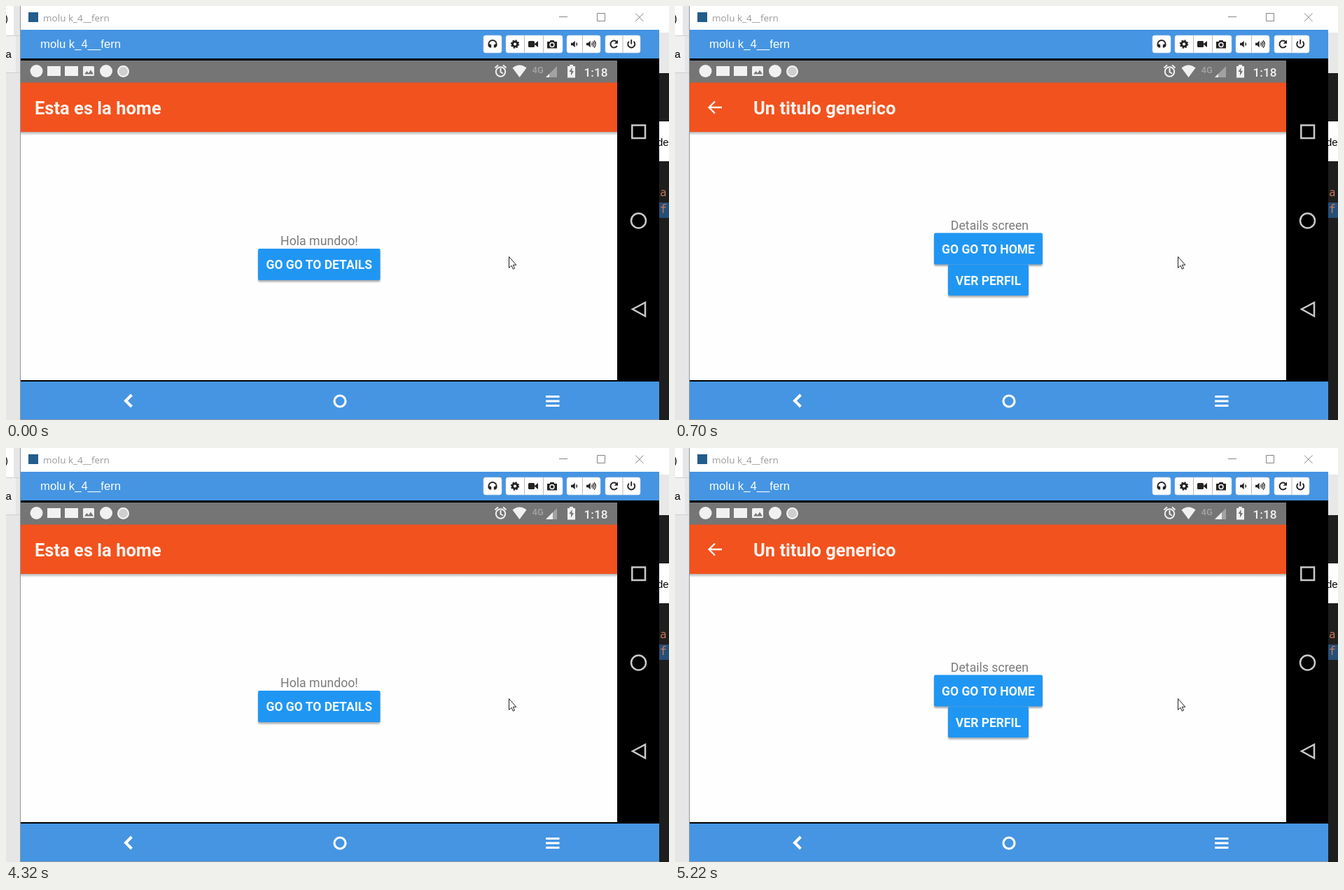
An HTML page for the animation above (8 s loop, 947x592 px).

```html
<!DOCTYPE html>
<html lang="es">
<head>
<meta charset="utf-8">
<title>Navegación entre pantallas</title>
<style>
  html, body { margin: 0; width: 100%; height: 100%; overflow: hidden; background: #e6e6e6; }
  svg { display: block; width: 947px; height: 592px; }
  .ui { font-family: "Liberation Sans", Arial, sans-serif; }
  .app { font-family: Roboto, sans-serif; }
  .title { font-size: 25.5px; font-weight: 700; fill: #fff5f0; }
  .label { font-size: 17.7px; fill: #7b7b7b; text-anchor: middle; }
  .action { font-size: 17.5px; font-weight: 700; fill: #f2f9ff; text-anchor: middle; }
  .code { font: 16px "Noto Sans Mono", monospace; fill: #c97b5b; }
  .line { fill: none; stroke-linejoin: miter; }
</style>
</head>
<body>
<svg viewBox="0 0 947 592">
  <defs>
    <linearGradient id="fade" x2="0" y2="1">
      <stop offset="0" stop-color="#999" stop-opacity=".75"/>
      <stop offset="1" stop-color="#999" stop-opacity="0"/>
    </linearGradient>
    <filter id="soft" x="-10%" y="-20%" width="120%" height="150%">
      <feGaussianBlur stdDeviation="1.3"/>
    </filter>
    <clipPath id="screen"><path d="M21 78H873V535H21Z"/></clipPath>
  </defs>

  <!-- windows behind -->
  <g class="ui" font-size="15">
    <path fill="#e6e6e6" d="M0 0H21V592H0Z"/>
    <path fill="#fff" d="M0 0H11V42H0Z"/>
    <path fill="#f0f0f0" d="M0 43H14V95H0Z"/>
    <path stroke="#cfcfcf" d="M0 42.5H20M0 95.5H20"/>
    <text x="-2" y="23">)</text><text x="-.5" y="74">a</text>
    <path fill="#fff" d="M933 0H947V222H933Z"/>
    <path fill="#e8e8e8" d="M933 38H947V96H933Z"/>
    <path fill="#1e1e1e" d="M933 96H947V165H933ZM933 222H947V592H933Z"/>
    <path fill="#264f78" d="M933 281H947V303H933Z"/>
    <text x="930" y="200">de</text>
    <g class="code"><text x="934" y="272">a:</text><text x="934" y="296">f:</text></g>
  </g>

  <!-- mirror window -->
  <path fill="#fff" d="M21 0H933V34H21Z"/>
  <path fill="#235d8c" d="M32 9H46V23H32Z"/>
  <text x="53" y="21.5" font-family="Open Sans, sans-serif" font-size="13.5" fill="#999">molu k_4__fern</text>
  <path class="line" stroke="#858585" d="M790 15.5H802M844.5 10.5H855.5V21.5H844.5ZM899 10.5L910.5 22M910.5 10.5L899 22"/>
  <path fill="#4595e3" d="M21 34H933V75H21ZM21 537H933V591H21Z"/>
  <path fill="#000" d="M21 75H933V537H21Z"/>
  <path fill="#8d969e" d="M20 0H21V592H20ZM21 591H933V592H21Z"/>
  <text class="ui" x="49" y="60" font-size="16.7" fill="#fff">molu k_4__fern</text>

  <g id="tools" fill="#fff" stroke="#c9d5e2" stroke-width=".6"></g>
  <g fill="#242424">
    <path class="line" stroke="#242424" stroke-width="1.8" d="M689.5 56V54a5.5 5 0 0 1 11 0V56"/>
    <path d="M688.7 54.5h2.5l2 1v4h-2.2l-2.3-2ZM701.3 54.5h-2.5l-2 1v4h2.2l2.3-2Z"/>
    <circle class="line" cx="727" cy="54.5" r="3.6" stroke="#242424" stroke-width="3"/>
    <circle class="line" cx="727" cy="54.5" r="5.2" stroke="#242424" stroke-width="2" stroke-dasharray="2.04"/>
    <rect x="746" y="50" width="9" height="9" rx="1.5"/><path d="M755 54l5-4v9l-5-4Z"/>
    <path d="M773 51h3.5l1-2h5l1 2h3.5v9.5h-14Z"/>
    <circle cx="780" cy="55.5" r="3" class="line" stroke="#fff" stroke-width="1.4"/>
    <path id="speaker" d="M807 52.7h2.5l3.2-3v9.6l-3.2-3H807Z"/>
    <use href="#speaker" x="22"/>
    <path class="line" stroke="#242424" stroke-width="1.3" d="M814.6 52.5q1.8 2 0 4M836.6 52.5q1.8 2 0 4M838.3 50.8q3.2 3.7 0 7.4M840 49.2q4.6 5.3 0 10.6"/>
    <path class="line" stroke="#242424" stroke-width="2" d="M872.5 51.5a5 5 0 1 0 .3 5.5"/>
    <path d="M874 48.5v5.3h-5.3Z"/>
    <path class="line" stroke="#242424" stroke-width="1.9" d="M890 50.7a5 5 0 1 0 6.5 0M893.2 48v6.5"/>
  </g>

  <!-- phone display -->
  <g class="app" clip-path="url(#screen)">
    <path fill="#fefefe" d="M21 78H873V535H21Z"/>
    <g id="home"></g>
    <path id="veil" fill="#fefefe" d="M21 111H873V535H21Z"/>
    <g id="details"></g>

    <path fill="#757575" d="M21 78H873V109.5H21Z"/>
    <g fill="#f1f1f1">
      <circle cx="43.5" cy="93" r="9"/>
      <path d="M59 86H78V100H59ZM84 86H103V100H84Z"/>
      <rect x="110" y="86" width="16" height="14" rx="1.5"/>
      <path fill="#757575" d="M112 97.5l3.5-4.5 2.5 3 3-4.5 4 6Z"/>
      <circle cx="143" cy="93" r="9"/>
      <circle cx="167.500" cy="93.500" r="7.500" fill="#cfcfcf" stroke="#f4f4f4" stroke-width="2"/>
      <path class="line" stroke="#f1f1f1" stroke-width="2" d="M706.500 89v5.500l3.500 2M698.500 88.500l4.500-4M714.500 88.500l-4.500-4"/>
      <circle class="line" cx="706.500" cy="94" r="6.700" stroke="#f1f1f1" stroke-width="2"/>
      <path d="M723.500 88.500Q733.500 80.500 743.500 88.500L733.500 102Z"/>
      <text x="751.500" y="95.500" font-size="13" font-weight="500" fill="#a4a4a4">4G</text>
      <path fill="#a2a2a2" d="M771 102L787 86V102Z"/>
      <path id="signal" fill="#ededed"/>
      <path d="M802 86h3v-2h5v2h3v16.500h-11Z"/>
      <path fill="#757575" d="M808.500 88l-4 6h2.500v5.500l4-6.500h-2.500Z"/>
      <text x="825.500" y="100.500" font-size="17.300" font-weight="500">1:18</text>
    </g>
  </g>

  <!-- navigation keys -->
  <g class="line" stroke="#c9c9c9" stroke-width="2.500">
    <path d="M894.300 170.500H913V189H894.300ZM895 433.500L913 424V443.500Z"/>
    <circle cx="903.500" cy="307" r="10.500"/>
  </g>
  <g class="line" stroke="#fff">
    <path stroke-width="4" d="M179.500 556L171 564.500L179.500 573"/>
    <circle cx="477" cy="565" r="8" stroke-width="3.200"/>
    <path stroke-width="3.200" d="M771 558.500H790.500M771 565H790.500M771 571.500H790.500"/>
  </g>
  <path fill="#fff" stroke="#222" d="M718.500 358.500V374.500L722 371.200L724.300 376.200L726.500 375.200L724.300 370.300H728.800Z"/>
</svg>
<script>
const $ = id => document.getElementById(id);

const header = `<path fill="#f2521e" d="M21 109H873V180H21Z"/>
  <path fill="url(#fade)" d="M21 180H873V185H21Z"/>`;
const title = (x, text) => `<text class="title" x="${x}" y="154.500">${text}</text>`;
const label = (x, y, text) => `<text class="label" x="${x}" y="${y}">${text}</text>`;
const button = (x, y, w, h, text) => `
  <rect x="${x}" y="${y + 2.5}" width="${w}" height="${h}" rx="2" fill="#777" opacity=".6" filter="url(#soft)"/>
  <rect x="${x}" y="${y}" width="${w}" height="${h}" rx="2" fill="#2096f3"/>
  <text class="action" x="${x + w / 2}" y="${y + h / 2 + 6.8}">${text}</text>`;

$('home').innerHTML = header + title(41, 'Esta es la home') +
  label(447.5, 342, 'Hola mundoo!') + button(360, 347, 174.5, 45, 'GO GO TO DETAILS');

$('details').innerHTML = header +
  '<text id="ghost" class="title" x="41" y="152.500" style="fill:#b8441c">Esta es la home</text>' +
  '<path class="line" stroke="#fff5f0" stroke-width="2.300" d="M67 145H49M57 136.500L48.500 145L57 153.500"/>' +
  title(112, 'Un titulo generico') + label(449.5, 320, 'Details screen') +
  button(370, 324.5, 155, 45, 'GO GO TO HOME') + button(390, 369.5, 115, 44.5, 'VER PERFIL');

// each group: left edge, right edge, dividers
$('tools').innerHTML = [[682, 708], [714, 795, 740.5, 767.5], [801, 849, 823.5], [856, 906, 881]]
  .map(([x, end, ...cuts]) => `<rect x="${x}" y="42" width="${end - x}" height="25" rx="3"/>` +
    cuts.map(c => `<path stroke="#b5bcc4" stroke-width="1" d="M${c} 42V67"/>`).join('')).join('');

// start time, opacity of the details screen, its vertical offset
const poses = [[0, 0, 0], [430, .87, 2], [550, 1, 0], [2880, 0, 0], [5070, .85, 2], [5220, 1, 0]];

function render(t) {
  const [, alpha, shift] = poses.filter(p => p[0] <= t).pop();
  const mixing = alpha > 0 && alpha < 1;
  $('veil').setAttribute('opacity', alpha === 1 ? 1 : mixing ? .8 : 0);
  $('details').setAttribute('opacity', alpha);
  $('details').setAttribute('transform', `translate(0 ${shift})`);
  $('ghost').setAttribute('opacity', mixing ? .16 : 0);
  const edge = t < 4320 ? 776 : 781;
  $('signal').setAttribute('d', `M771 102L${edge} ${873 - edge}V102Z`);
}

function tick(now) {
  render(now % 8000);
  requestAnimationFrame(tick);
}
render(0);
requestAnimationFrame(tick);
</script>
</body>
</html>
```
